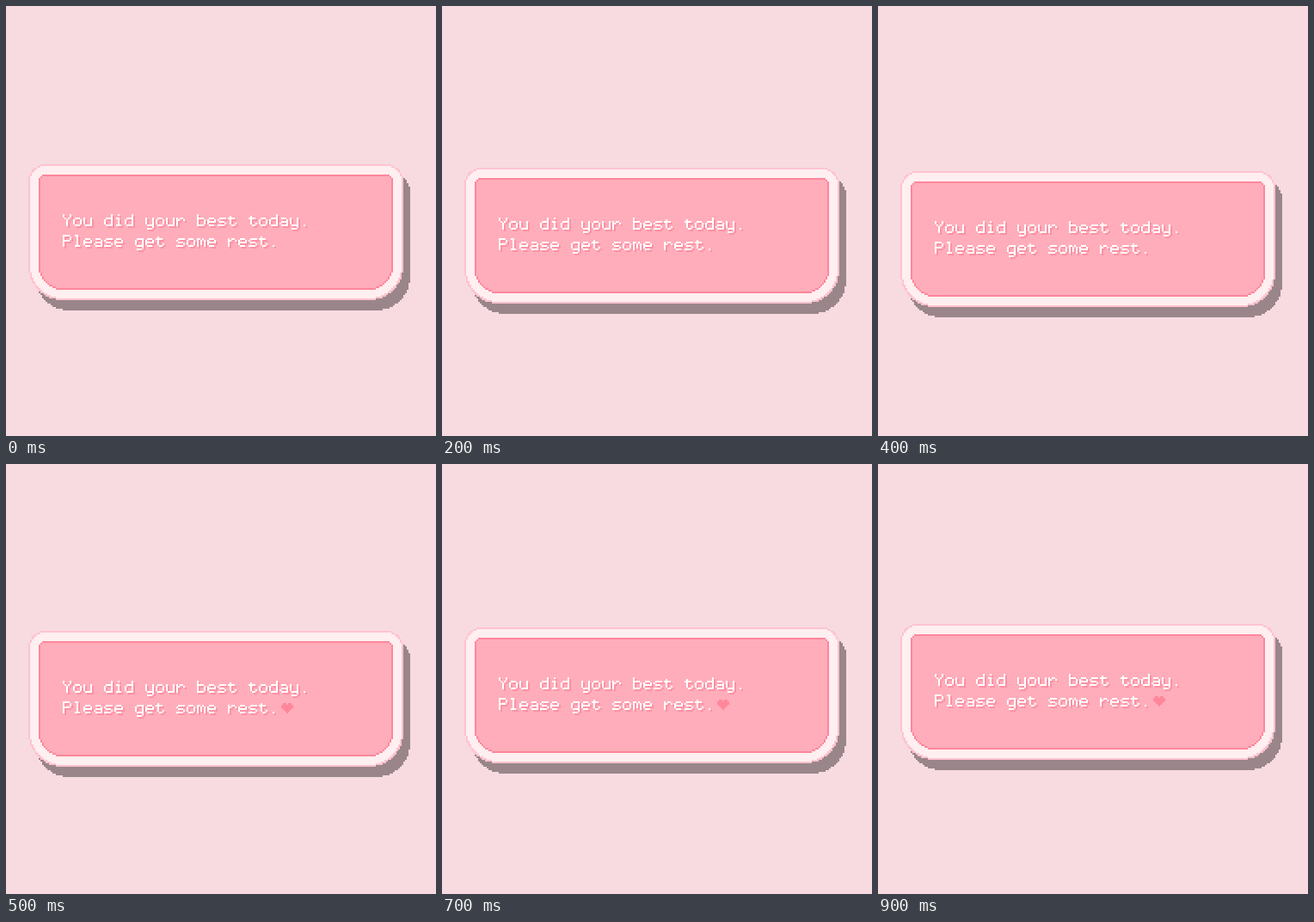
An HTML page with a canvas for the animation above (1000 ms loop, 500x500 px).

```html
<!DOCTYPE html>
<html lang="en">
<head>
<meta charset="utf-8">
<title>Get some rest</title>
<style>
  html, body { margin: 0; width: 100%; height: 100%; overflow: hidden; background: #f7dbe0; }
  canvas { display: block; width: 500px; height: 500px; image-rendering: pixelated; }
</style>
</head>
<body>
<canvas id="stage" width="500" height="500" role="img"
  aria-label="You did your best today. Please get some rest."></canvas>
<script>
const ctx = document.getElementById('stage').getContext('2d');
const CELL = 2, PITCH = 12, LEADING = 24;
const LOOP = 1000, STEP = 100;
const LINES = ['You did your best today.', 'Please get some rest.'];

const COLORS = {
  back: '#f7dbe0', shadow: '#9a868a', outline: '#ffc3cf',
  ring: '#ffeff0', edge: '#ff869b', panel: '#ffadba',
  textShade: '#fb91a4', text: '#ffffff', heart: '#ff869b'
};

// Pen strokes on a 5 x 9 grid: each point is column then row.
const GLYPHS = {
  Y: '00 01 23 41 40|23 26',
  P: '06 00 30|41 42|33 03',
  a: '12 32|43 46 16|05|14 44',
  b: '00 06 36|45 43|32 02',
  d: '40 46 16|05 03|12 42',
  e: '04 44 43|32 12|03 05|16 36',
  g: '12 42 47|38 18|03 05|16 46',
  i: '20|12 22 26|16 36',
  l: '10 20 26|16 36',
  m: '02 06|12|23 25|32|43 46',
  o: '12 32|43 45|36 16|05 03',
  r: '02 06|13 22 32 43',
  s: '42 12|03|14 34|45|36 06',
  t: '11 15|26 36 45|02 32',
  u: '02 05|16 46|42 46',
  y: '02 05|16 46|42 47|38 18',
  '.': '26'
};

function box(x, y, w, h) {
  ctx.fillRect(x, y, w, h);
}

// Rounded panel with stair-stepped corners.
function panel(left, top, right, bottom, rTop, rBottom, color) {
  ctx.fillStyle = color;
  for (let y = top; y < bottom; y += CELL) {
    const mid = y + CELL / 2;
    const upper = mid < top + rTop;
    const r = upper ? rTop : rBottom;
    const d = Math.max(0, upper ? top + r - mid : mid - (bottom - r));
    const inset = Math.round((r - Math.sqrt(r * r - d * d)) / CELL) * CELL;
    box(left + inset, y, right - left - 2 * inset, CELL);
  }
}

function stroke(points, x, y) {
  const plot = (c, r) => box(x + c * CELL, y + r * CELL, CELL, CELL);
  let [c, r] = points[0];
  plot(c, r);
  for (const [toC, toR] of points.slice(1)) {
    while (c !== toC || r !== toR) {
      c += Math.sign(toC - c);
      r += Math.sign(toR - r);
      plot(c, r);
    }
  }
}

function write(text, x, y) {
  [...text].forEach((ch, i) => {
    if (!GLYPHS[ch]) return;
    for (const path of GLYPHS[ch].split('|')) {
      stroke(path.split(' ').map(p => [...p].map(Number)), x + i * PITCH, y);
    }
  });
}

function writeAll(dx, dy, color) {
  ctx.fillStyle = color;
  LINES.forEach((line, i) => write(line, 66 + dx, 242 + i * LEADING + dy));
}

function heart(x, y) {
  ctx.fillStyle = COLORS.heart;
  box(x + 2, y, 4, 2);
  box(x + 8, y, 4, 2);
  box(x, y + 2, 14, 4);
  for (let i = 1; i < 4; i++) box(x + 2 * i, y + 4 + 2 * i, 14 - 4 * i, 2);
}

function draw(ms) {
  const step = Math.floor((ms % LOOP) / STEP);
  const drop = 2 * (5 - Math.abs(5 - step));

  ctx.setTransform(1, 0, 0, 1, 0, 0);
  ctx.fillStyle = COLORS.back;
  box(0, 0, 500, 500);
  ctx.translate(0, drop);

  panel(34, 196, 470, 354, 20, 40, COLORS.shadow);
  panel(26, 184, 462, 342, 20, 40, COLORS.outline);
  panel(28, 186, 460, 340, 18, 38, COLORS.ring);
  panel(38, 196, 450, 330, 8, 28, COLORS.edge);
  panel(40, 198, 448, 328, 6, 26, COLORS.panel);

  writeAll(CELL, CELL, COLORS.textShade);
  writeAll(0, 0, COLORS.text);
  if (step % 2) heart(320, 268);
}

let start;
function tick(now) {
  start ??= now;
  draw(Math.max(0, now - start));
  requestAnimationFrame(tick);
}
draw(0);
requestAnimationFrame(tick);
</script>
</body>
</html>
```
